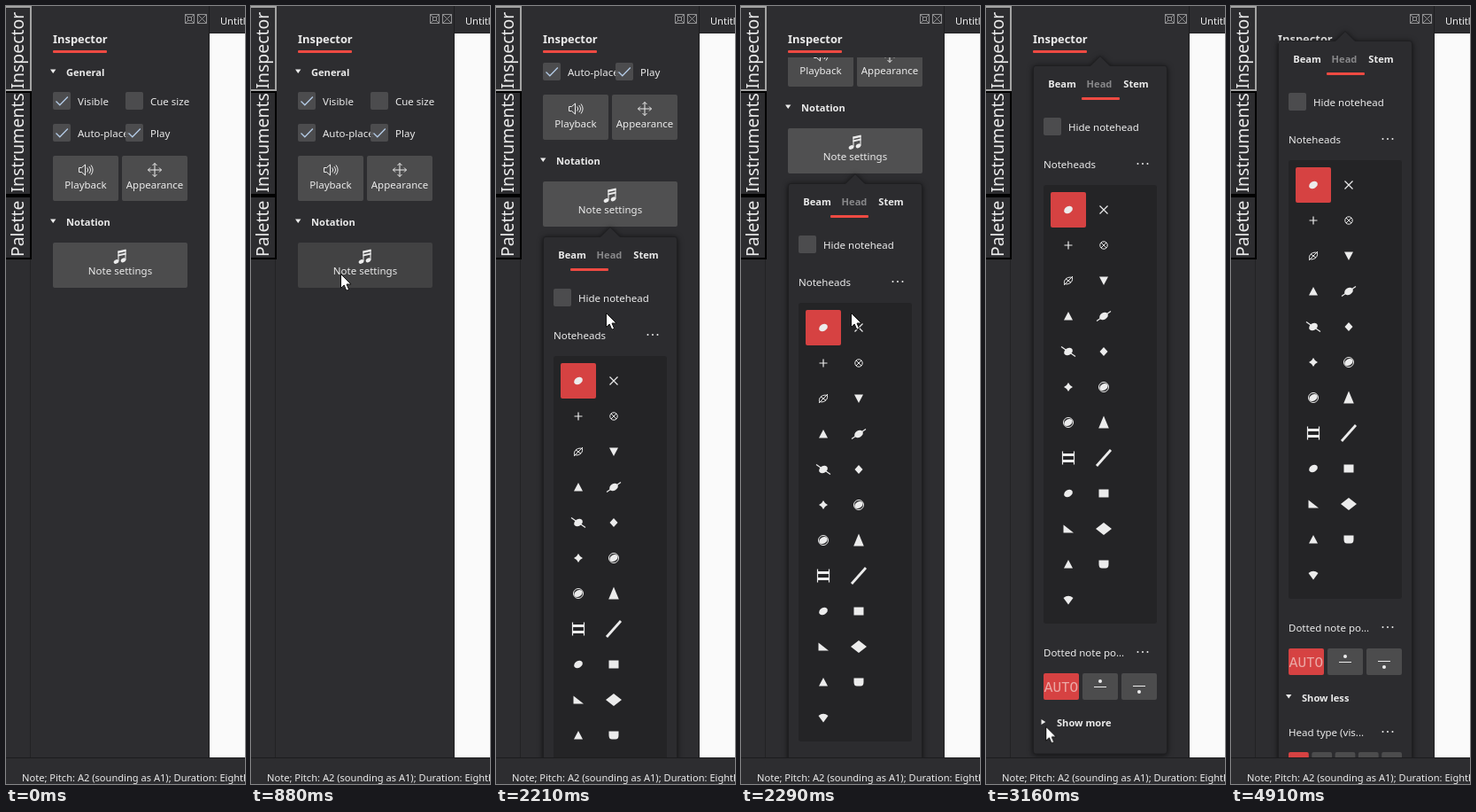
These frames come from a looping animation (270 px wide and 878 px high, 4.98 s). An HTML page:

```html
<!DOCTYPE html>
<html lang="en">
<head>
<meta charset="utf-8">
<title>Inspector panel</title>
<style>
html, body { margin: 0; width: 100%; height: 100%; overflow: hidden; background: #2d2d30; }
svg { display: block; width: 270px; height: 878px; }
text { font: 500 11.5px "Noto Sans", "Open Sans", sans-serif; fill: #ebebeb; white-space: pre; }
.b { font-size: 11.1px; font-weight: 700; }
.title { font-size: 12.9px; font-weight: 700; }
.tiny { font-size: 8.6px; font-weight: 700; fill: #fff; }
.mono { font: 16px "Liberation Mono", monospace; fill: #eba9a6; }
.side { font-size: 19.4px; font-weight: 400; }
.status { font-size: 11.1px; }
.dim { fill: #88888a; }
.off { fill: #454548; }
.mid { text-anchor: middle; }
.ink { fill: #ececec; }
.line { fill: none; stroke: #ececec; stroke-width: 1.2; }
.frame { fill: #2c2c2f; stroke: #1f1f21; filter: drop-shadow(0 1px 3px #000a); }
</style>
</head>
<body>
<svg id="stage" viewBox="0 0 270 878" xmlns="http://www.w3.org/2000/svg"></svg>
<script>
const LOOP = 4980, STEP = 50;
const RED = '#d64242', ACCENT = '#ee4a42', BUTTON = '#4c4c4d';

// ---- drawing helpers ----
const text = (x, y, s, cls = '') => `<text x="${x}" y="${y}" class="${cls}">${s}</text>`;
const box = (x, y, w, h, fill, r = 2, extra = '') =>
  `<rect x="${x}" y="${y}" width="${w}" height="${h}" rx="${r}" fill="${fill}" ${extra}/>`;
const ink = d => `<path class="ink" d="${d}"/>`;
const line = (d, w = 1.2) => `<path class="line" d="${d}" style="stroke-width:${w}"/>`;
const at = (x, y, s) => `<g transform="translate(${x} ${y})">${s}</g>`;
const dot = (x, y, r = 1) => `<circle class="ink" cx="${x}" cy="${y}" r="${r}"/>`;
const more = y => [171.5, 177, 182.5].map(x => dot(x, y)).join('');
const down = (x, y) => ink(`M${x} ${y}h6.4l-3.2 4.6z`);
const right = (x, y, cls = 'ink') => `<path class="${cls}" d="M${x} ${y}v6l4.8-3z"/>`;
const head = (x = 0, y = 0, rx = 5.2, ry = 3.8) =>
  `<ellipse class="ink" cx="${x}" cy="${y}" rx="${rx}" ry="${ry}" transform="rotate(-32 ${x} ${y})"/>`;
const check = (x, y, on) => box(x, y, 20, 20, 'rgba(80,80,82,.9)') +
  (on ? `<path d="M${x + 3.5} ${y + 10.5}l4.3 4.3 9-9.3" fill="none" stroke="#b4cbe6" stroke-width="1.3"/>` : '');
const sideTab = (y, h, stroke, end, s) =>
  `<rect x="-1" y="${y}" width="29" height="${h}" fill="#2d2d30" stroke="${stroke}" stroke-width="2"/>` +
  `<text class="side" transform="translate(19.5 ${end}) rotate(-90)">${s}</text>`;
const frame = b =>
  `<path class="frame" d="M56 329.5H118L129 318.5L140 329.5H202q2.5 0 2.5 3V${b - 3}q0 3-3 3H56q-2.5 0-2.5-3V332.5q0-3 2.5-3z"/>`;
const tabs = current => [['Beam', 86], ['Head', 128], ['Stem', 169.5]]
  .map(([s, x]) => text(x, 354, s, 'b mid' + (s === current ? ' dim' : ''))).join('');

// ---- note symbols, centred on 0,0 ----
const stem = head(-4, 9, 4, 3) + line('M-.5 9V-12', 1.4);
const bars = list => list.map(([y, a, b]) => line(`M${a} ${y}H${b}`, 3)).join('');
const beams = [
  [40, 0, stem + bars([[-10.5, -.5, 8], [-5, -.5, 8]])],
  [0, 40, stem + bars([[-10.5, -9, 8.5], [-5, -9, 8.5]])],
  [40, 40, stem + line('M-.5-12C.5-6 6.5-4 5.5 4', 1.6)],
  [0, 80, stem + bars([[-10.5, -9, 8.5], [-5, -.5, 8.5]])],
  [40, 80, stem + bars([[-10.5, -9, 8.5], [-5, -9, 8.5], [.5, -.5, 8.5]])]
];
const ring = line('M4.2 0A4.2 4.2 0 1 1-4.2 0A4.2 4.2 0 1 1 4.2 0z', 1);
const orb = head(0, 0, 5, 3.6) + line('M5.5 0A5.5 5.5 0 1 1-5.5 0A5.5 5.5 0 1 1 5.5 0z', 1);
const heads = [
  head(), line('M-4.5-4.5L4.5 4.5M4.5-4.5L-4.5 4.5'),
  line('M-4.5 0H4.5M0-4.5V4.5'), ring + line('M-3-3L3 3M3-3L-3 3', 1),
  line('M-4.5 3.5C-5.5-2 0-5 4.5-3.5C5.5 2 0 5-4.5 3.5zM-5 5L5-5M-3-2L3 2', 1), ink('M-5-4.5H5L0 5z'),
  ink('M-5 4.5H5L0-5z'), head() + line('M-8 5.5L8-5.5'),
  head() + line('M-8-5.5L8 5.5'), ink('M0-5L4.5 0L0 5L-4.5 0z'),
  ink('M0-5Q1.5-1.5 5 0Q1.5 1.5 0 5Q-1.5 1.5-5 0Q-1.5-1.5 0-5z'), orb,
  orb, ink('M-5.8 6.5H5.8L0-7.5z'),
  line('M-6.5-7.5V7.5M6.5-7.5V7.5', 1.2) + line('M-6.5-3.5H6.5M-6.5 3.5H6.5', 2.8), line('M-8 9L8-9', 2.8),
  head(), ink('M-5.5-4.5H5.5V4.5H-5.5z'),
  ink('M-5.5-4.5L6 4.5H-5.5z'), ink('M0-7L9 0L0 7L-9 0z'),
  ink('M-5 4.5H5L0-5z'), ink('M-5.5-4.5H5.5V0Q5.5 4.5 2 4.5H-2Q-5.5 4.5-5.5 0z'),
  ink('M-5.5-2Q0-6.5 5.5-2L0 5.5z')
];

// ---- panel under the popup ----
const settings =
  down(50, 71.5) + text(68, 79, 'General', 'b') +
  text(81, 111.5, 'Visible') + text(163, 111.5, 'Cue size') +
  text(81, 147.5, 'Auto-place') + text(163, 147.5, 'Play') +
  check(53, 97, 1) + check(135, 97, 0) + check(53, 133, 1) + check(135, 133, 1) +
  box(53, 169, 74, 51, BUTTON) + box(131, 169, 74, 51, BUTTON) +
  line('M82.5 182.5h3l4-3.5v12l-4-3.5h-3zM91.7 182.5q2 2.5 0 5M93.8 181q3.4 4 0 8M96 179.5q4.2 5.5 0 11', 1) +
  line('M160.5 185H175.5M168 177.5V192.5M163 182.5L160.5 185L163 187.5M173 182.5L175.5 185L173 187.5M165.5 180L168 177.5L170.5 180M165.5 190L168 192.5L170.5 190', 1) +
  text(90, 206, 'Playback', 'mid') + text(168, 206, 'Appearance', 'mid') +
  down(50, 240.5) + text(68, 248, 'Notation', 'b') +
  box(53, 267, 152, 51, BUTTON, 2, 'id="noteButton"') +
  head(124.5, 288.5, 3, 2.2) + head(132.5, 286.8, 3, 2.2) +
  line('M127 288V276.5M135 286.5V275', 1.1) + ink('M126.5 276.5L135.5 274.5V277L126.5 279zM126.5 280.5L135.5 278.5V280.5L126.5 282.5z') +
  text(129, 303, 'Note settings', 'mid');

// ---- popup pages ----
const beamPage = frame(667) + tabs('Beam') +
  text(65, 409, 'Beam types') + more(404.5) +
  box(65, 428, 128, 136, '#242426', 3) + box(73, 436, 40, 40, RED) +
  text(93, 459, 'AUTO', 'tiny mid') +
  beams.map(([x, y, s]) => at(93 + x, 456 + y, s)).join('') +
  box(65, 576, 128, 30, '#323235') + text(129, 595, 'Force horizontal', 'off mid') +
  right(62.5, 627, 'off') + text(80, 636, 'Show more', 'b off');

const headPage = tabs('Head') +
  check(65, 388, 0) + text(93, 402.5, 'Hide notehead') +
  text(65, 444.5, 'Noteheads') + more(440) +
  box(65, 464, 128, 495, '#242426', 3) + box(73, 472, 40, 40, RED) +
  heads.map((s, i) => at(93 + i % 2 * 40, 492 + (i >> 1) * 40, s)).join('') +
  text(65, 995.5, 'Dotted note po...') + more(991) +
  box(65, 1015, 40, 30, RED) + box(109, 1015, 40, 30, BUTTON) + box(153, 1015, 40, 30, BUTTON) +
  text(85, 1035.5, 'AUTO', 'mono mid') +
  line('M122 1030.5H136M166 1029.5H180') + dot(129, 1024, 2) + dot(173, 1036, 2);

const folded = right(62.5, 1067) + text(80, 1075, 'Show more', 'b');
const unfolded = down(62, 1067) + text(80, 1075, 'Show less', 'b') +
  text(65, 1113.5, 'Head type (vis...') + more(1109) +
  [0, 1, 2, 3, 4].map(i => box(65 + i * 26.3, 1132, 22.8, 30, i ? BUTTON : RED)).join('');

const group = (cls, s) => `<g class="${cls}">${s}</g>`;

document.getElementById('stage').innerHTML =
  `<clipPath id="view"><rect x="28" y="58" width="201" height="790"/></clipPath>` +
  box(0, 0, 270, 878, '#2d2d30', 0) +
  box(27, 285, 1, 563, '#222224', 0) +
  sideTab(1, 94, '#a3a3a3', 93.5, 'Inspector') +
  sideTab(97, 116, '#000', 210.5, 'Instruments') +
  sideTab(215, 70, '#000', 283, 'Palette') +
  `<g fill="none" stroke="#9c9c9e" stroke-width=".9">` +
  `<path d="M202.5 9.5h10v10h-10zM205.5 12.5h4v4h-4zM202.5 9.5l3 3M212.5 9.5l-3 3M202.5 19.5l3-3M212.5 19.5l-3-3"/>` +
  `<path d="M216.5 9.5h10v10h-10zl10 10M226.5 9.5l-10 10"/></g>` +
  text(53, 42, 'Inspector', 'title') + box(53, 50, 61, 3, ACCENT, 1) +
  `<g clip-path="url(#view)">${group('scroll', settings)}</g>` +
  group('scroll',
    group('beam', beamPage) +
    group('fold', frame(1106)) + group('open', frame(1260)) +
    group('head', headPage) + group('fold', folded) + group('open', unfolded) +
    group('popup', box(65, 365, 43, 3, ACCENT, 1, 'id="marker"'))) +
  box(229, 0, 1, 848, '#1e1e20', 0) +
  box(230, 31, 40, 817, '#fafafa', 0) + box(230, 30, 40, 1, '#222224', 0) +
  text(242, 21, 'Untitled', 'status') +
  box(0, 848, 270, 30, '#2d2d30', 0) + box(0, 848, 270, 1, '#1c1c1e', 0) +
  text(18, 875, 'Note; Pitch: A2 (sounding as A1); Duration: Eighth', 'status') +
  `<g id="cursor"><path d="M.5.5V16.5L4.2 13L6.8 19.2L9.6 18L7 12H12z" fill="#fff" stroke="#111" stroke-width="1"/></g>`;

// ---- motion: rows are [ms, ...values]; hold keeps each value until the next row ----
function run(selector, rows, style, hold = true) {
  const all = [...rows, [LOOP, ...rows[rows.length - 1].slice(1)]];
  const keys = all.map(([t, ...v], i) => {
    const gap = i + 1 < all.length ? all[i + 1][0] - t : 0;
    const n = hold ? 1 : Math.max(1, Math.round(gap / STEP));
    return { offset: t / LOOP, easing: `steps(${n}, end)`, ...style(...v) };
  });
  for (const el of document.querySelectorAll(selector)) {
    el.animate(keys, { duration: LOOP, iterations: Infinity }).startTime = start;
  }
}
const start = document.timeline.currentTime ?? performance.now();
const move = (x, y) => ({ transform: `translate(${x}px, ${y}px)` });
const show = (cls, from, to = LOOP) =>
  run('.' + cls, to < LOOP ? [[0, 0], [from, 1], [to, 0]] : [[0, 0], [from, 1]], opacity => ({ opacity }));

show('popup', 1130);
show('beam', 1130, 2210);
show('head', 2210);
show('fold', 2210, 3650);
show('open', 3650);

run('#noteButton', [[0, BUTTON], [880, '#424243'], [1130, '#505051']], fill => ({ fill }));
run('#marker', [[0, 0], [2210, 19], [2260, 36], [2310, 43]], x => move(x, 0));
run('.scroll', [
  [0, 0], [2210, -69], [2260, -129], [2310, -181], [2360, -225], [2410, -262],
  [3650, -271], [3690, -281], [3730, -290]
], y => move(0, y));

run('#cursor', [
  [0, 300, 900], [30, 222, 812], [270, 164, 530], [510, 101, 318],
  [560, 101, 314], [680, 101, 302], [1080, 101, 302], [1520, 114, 347],
  [1620, 120, 364], [1670, 121, 365], [1920, 124, 346], [2440, 124, 346],
  [2710, 109, 731], [2760, 106, 745], [3000, 74, 821], [3190, 65, 810],
  [3970, 65, 810], [4170, 224, 866], [4220, 300, 900], [4680, 300, 900],
  [4730, 247, 870], [4860, 264, 862], [4910, 300, 900]
], move, false);
</script>
</body>
</html>
```
